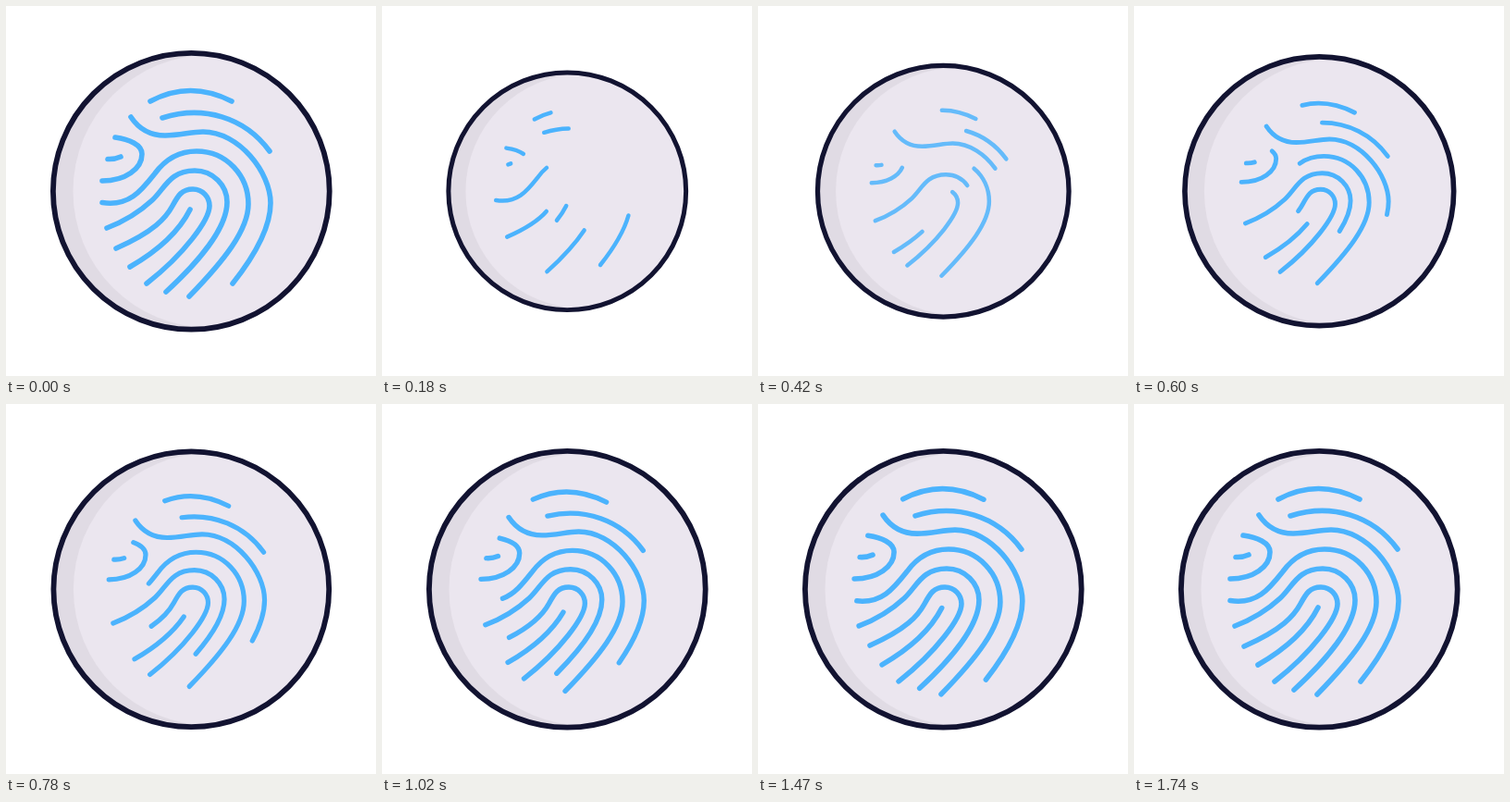
These frames come from a looping animation (400 px wide and 400 px high, 3800 ms). An HTML page:

```html
<!DOCTYPE html>
<html lang="en">
<head>
<meta charset="utf-8">
<title>Fingerprint</title>
<style>
  html, body { margin: 0; width: 100%; height: 100%; overflow: hidden; background: #fff; }
  svg { display: block; width: 100%; height: 100%; }
</style>
</head>
<body>
<svg viewBox="0 0 400 400">
  <clipPath id="disc"><circle cx="200.3" cy="200.3" r="149"/></clipPath>
  <g id="badge">
    <circle cx="200.3" cy="200.3" r="149" fill="#e0dbe4"/>
    <circle cx="220" cy="200.3" r="147.5" fill="#ebe6ef" clip-path="url(#disc)"/>
    <circle cx="200.3" cy="200.3" r="149.4" fill="none" stroke="#121331" stroke-width="5.8"/>
  </g>
  <g id="print" fill="none" stroke="#4bb3fd" stroke-width="5.6" stroke-linecap="round">
    <path pathLength="1" d="M156 103Q199 80 244 103"/>
    <path pathLength="1" d="M169 121C213 107 258 120 285 157"/>
    <path pathLength="1" d="M245 300C268 271 286 240 286 213C286 180 252 136 213 136C200 136 188 140 172 140C155 140 143 132 135 120"/>
    <path pathLength="1" d="M118 142C133 144 147 150 147 160C147 176 129 189 104 189"/>
    <path pathLength="1" d="M124 163Q117 166 110 165.5"/>
    <path pathLength="1" d="M104 212.5C133 217 146 200 161 181C172 166 186 157 206 157C239 157 262 184 262 214C262 242 236 275 198 314"/>
    <path pathLength="1" d="M173 309C208 277 239 240 239 212C239 194 224 178 204 178C177 178 172 197 158 210C145 222 130 232 109 240"/>
    <path pathLength="1" d="M119 262C160 244 173 229 180 216C186 205 190 198 202 198C213 198 220 207 220 216C220 231 193 268 152 300"/>
    <path pathLength="1" d="M199 220C188 242 167 263 134 282"/>
  </g>
</svg>
<script>
const LOOP = 3800, STEP = 30;
// Times in steps: pressed in, badge back at rest, print complete.
const PRESSED = 9, BADGE_END = 32, PRINT_END = 58;

const badge = document.getElementById('badge');
const print = document.getElementById('print');

const progress = (t, from, to) => Math.min(1, Math.max(0, (t - from) / (to - from)));
const smooth = u => u * u * (3 - 2 * u);
const remaining = u => (1 - u) ** 3;

function bezierEase(x1, y1, x2, y2) {
  const axis = (a, b, s) => 3 * (1 - s) ** 2 * s * a + 3 * (1 - s) * s * s * b + s ** 3;
  return u => {
    let low = 0, high = 1;
    for (let i = 0; i < 24; i++) {
      const mid = (low + high) / 2;
      if (axis(x1, x2, mid) < u) low = mid; else high = mid;
    }
    return axis(y1, y2, high);
  };
}
const decelerate = bezierEase(.05, .7, .3, 1);

function scaleAtCentre(group, scale) {
  group.setAttribute('transform', `translate(200 200) scale(${scale}) translate(-200 -200)`);
}

function trim(start, end) {
  print.setAttribute('stroke-dasharray', start <= 0 && end >= 1 ? 'none' : `${end - start} 2`);
  print.setAttribute('stroke-dashoffset', -start);
}

function draw(t) {
  const pressing = t < PRESSED;
  const press = smooth(progress(t, 0, PRESSED));
  const drawn = progress(t, PRESSED, PRINT_END);

  scaleAtCentre(badge, 1 - .19 * (pressing ? press : remaining(progress(t, PRESSED, BADGE_END))));
  scaleAtCentre(print, 1 - .27 * (pressing ? press : remaining(drawn)));
  if (pressing) trim(0, 1 - press);
  else trim(1 - decelerate(drawn), 1);
  print.setAttribute('opacity', pressing ? 1 : progress(t, PRESSED, PRESSED + 6));
}

const began = performance.now();
function tick() {
  const elapsed = (performance.now() - began) % LOOP;
  draw(Math.min(PRINT_END, Math.floor(elapsed / STEP)));
  requestAnimationFrame(tick);
}
tick();
</script>
</body>
</html>
```
